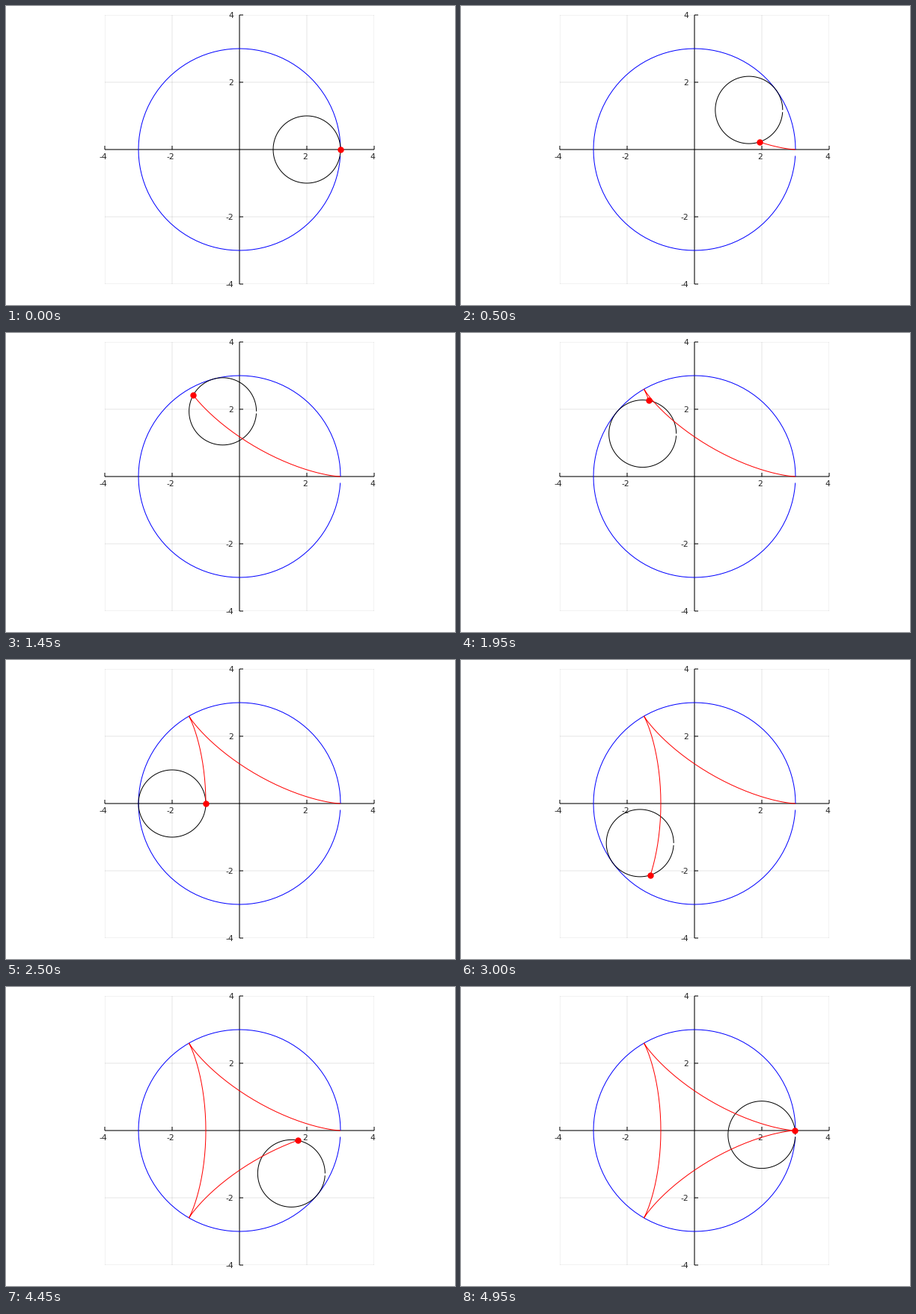
A matplotlib script that plays this animation: 600 by 400 pixels, repeating every 5 s.

```python
import numpy as np
import matplotlib.pyplot as plt
from matplotlib.animation import FuncAnimation

W, H, DPI = 600, 400, 100
CX, CY, UNIT = 312, 192, 45
STEPS = 100
PT = 72 / DPI

plt.rcParams["path.snap"] = False
fig = plt.figure(figsize=(W / DPI, H / DPI), dpi=DPI, facecolor="white")
ax = fig.add_axes([0, 0, 1, 1])
ax.set_xlim(0, W)
ax.set_ylim(H, 0)
ax.axis("off")


def to_px(x, y):
    return CX + UNIT * np.asarray(x), CY - UNIT * np.asarray(y)


def line(xs, ys, color="black", z=2, **kw):
    return ax.plot(xs, ys, color=color, lw=PT, zorder=z,
                   solid_capstyle="butt", **kw)[0]


def label(x, y, text, ha):
    ax.text(x, y, text, ha=ha, va="baseline", color="#262626",
            family="DejaVu Sans", fontsize=10.8 * PT, zorder=2)


left, bottom = to_px(-4, -4)
right, top = to_px(4, 4)
frame = plt.Rectangle((left, top), right - left, bottom - top,
                      transform=ax.transData)

# Grid, axes, ticks and labels
for v in (-4, -2, 0, 2, 4):
    px, py = to_px(v, v)
    for xs, ys in (([px, px], [top, bottom]), ([left, right], [py, py])):
        line(xs, ys, z=1, alpha=0.1).set_clip_path(frame)
    if v:
        line([px, px], [CY, CY - 5])
        line([CX, CX + 5], [py, py])
        label(px - 2, CY + 13, str(v), "center")
        label(CX - 7.5, py + 4, str(v), "right")
line([left, right], [CY, CY])
line([CX, CX], [top, bottom])

# The open end of each circle is one step wide
theta = 2 * np.pi * np.arange(STEPS) / STEPS
cos, sin = np.cos(theta), np.sin(theta)
path_x, path_y = to_px(2 * cos + np.cos(2 * theta), 2 * sin - np.sin(2 * theta))

line(*to_px(3 * cos, 3 * sin), color="blue", z=3)
wheel = line([], [], z=4)
trail = line([], [], color="red", z=5)
dot, = ax.plot([], [], "o", color="red", ms=8.4 * PT, mew=0, zorder=6)


def draw(i):
    wheel.set_data(*to_px(2 * cos[i] + cos, 2 * sin[i] + sin))
    trail.set_data(path_x[:i + 1], path_y[:i + 1])
    dot.set_data([path_x[i]], [path_y[i]])
    return wheel, trail, dot


anim = FuncAnimation(fig, draw, frames=STEPS, interval=50,
                     init_func=lambda: draw(0), repeat=True, repeat_delay=0)
plt.show()
```
